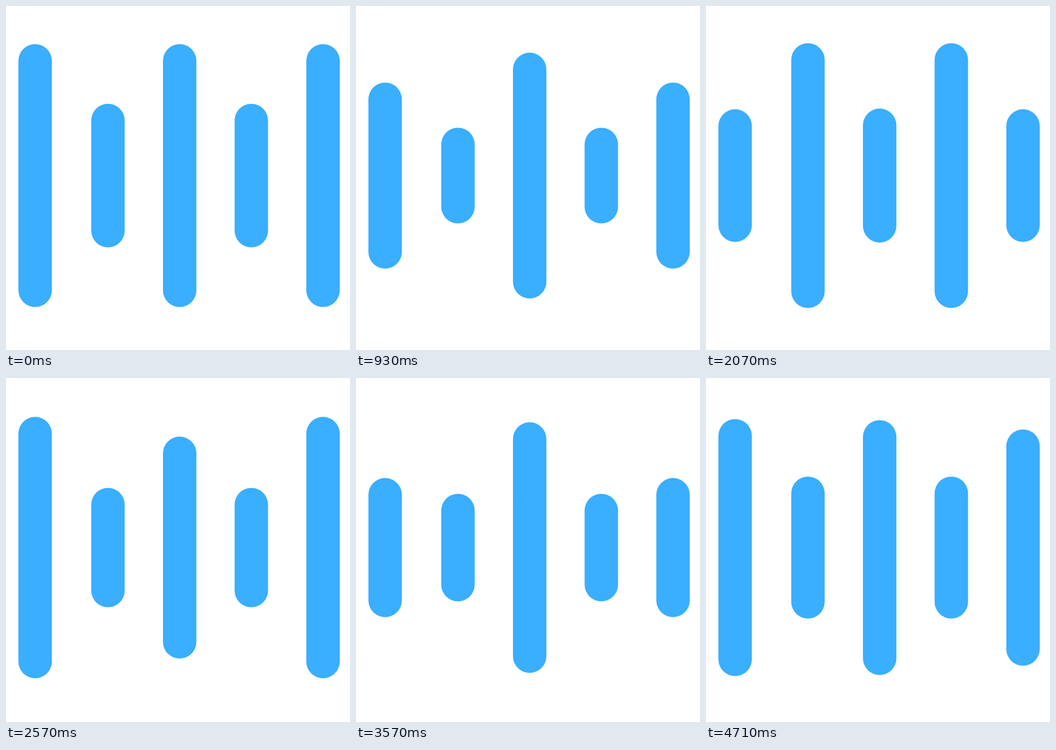
Animation of 640 by 640 pixels, one loop 4780 ms. Source, as an HTML page:

```html
<!DOCTYPE html>
<html lang="en">
<head>
<meta charset="utf-8">
<title>Sound bars</title>
<style>
  html, body { margin: 0; height: 100%; overflow: hidden; background: #fff; }
  svg { display: block; width: 100%; height: 100%; }
</style>
</head>
<body>
<svg viewBox="0 0 640 640" fill="#3aaeff"></svg>
<script>
const LOOP = 4780, FPS = 14, LAST_STEP = 66;
const BEATS_PER_SECOND = 2.4, LOOP_BEATS = 11.5;
const WIDTH = 62.2, MIDDLE = 315.5;

// Bar height on each beat; the last half beat leads back to the first height
const left = [489, 200, 345, 350, 143, 250, 513, 358, 240, 273, 275, 460];
const right = [...left.slice(0, 10), 307, 356];
const inner = [267, 621, 200, 104, 414, 495, 180, 425, 280, 140, 51, 259];
const center = [489, 220, 436, 529, 226, 250, 457, 200, 372, 537, 277, 449];

function heightAt(heights, beat) {
  const i = Math.floor(beat);
  const from = heights[i], to = heights[(i + 1) % heights.length];
  return from + (to - from) * (beat - i) / Math.min(1, LOOP_BEATS - i);
}

const svg = document.querySelector("svg");
const bars = [[23.1, left], [158.6, inner], [292, center], [425.3, inner], [558.7, right]]
  .map(([x, heights]) => {
    const rect = document.createElementNS(svg.namespaceURI, "rect");
    for (const [name, value] of Object.entries({ x, width: WIDTH, rx: WIDTH / 2 }))
      rect.setAttribute(name, value);
    svg.append(rect);
    return { rect, heights };
  });

function draw(now) {
  const step = Math.min(LAST_STEP, Math.floor((now % LOOP + 5) * FPS / 1000));
  for (const { rect, heights } of bars) {
    const height = heightAt(heights, step / FPS * BEATS_PER_SECOND);
    rect.setAttribute("y", MIDDLE - height / 2);
    rect.setAttribute("height", height);
  }
}

const start = performance.now();
function tick() {
  draw(performance.now() - start);
  requestAnimationFrame(tick);
}
tick();
</script>
</body>
</html>
```
